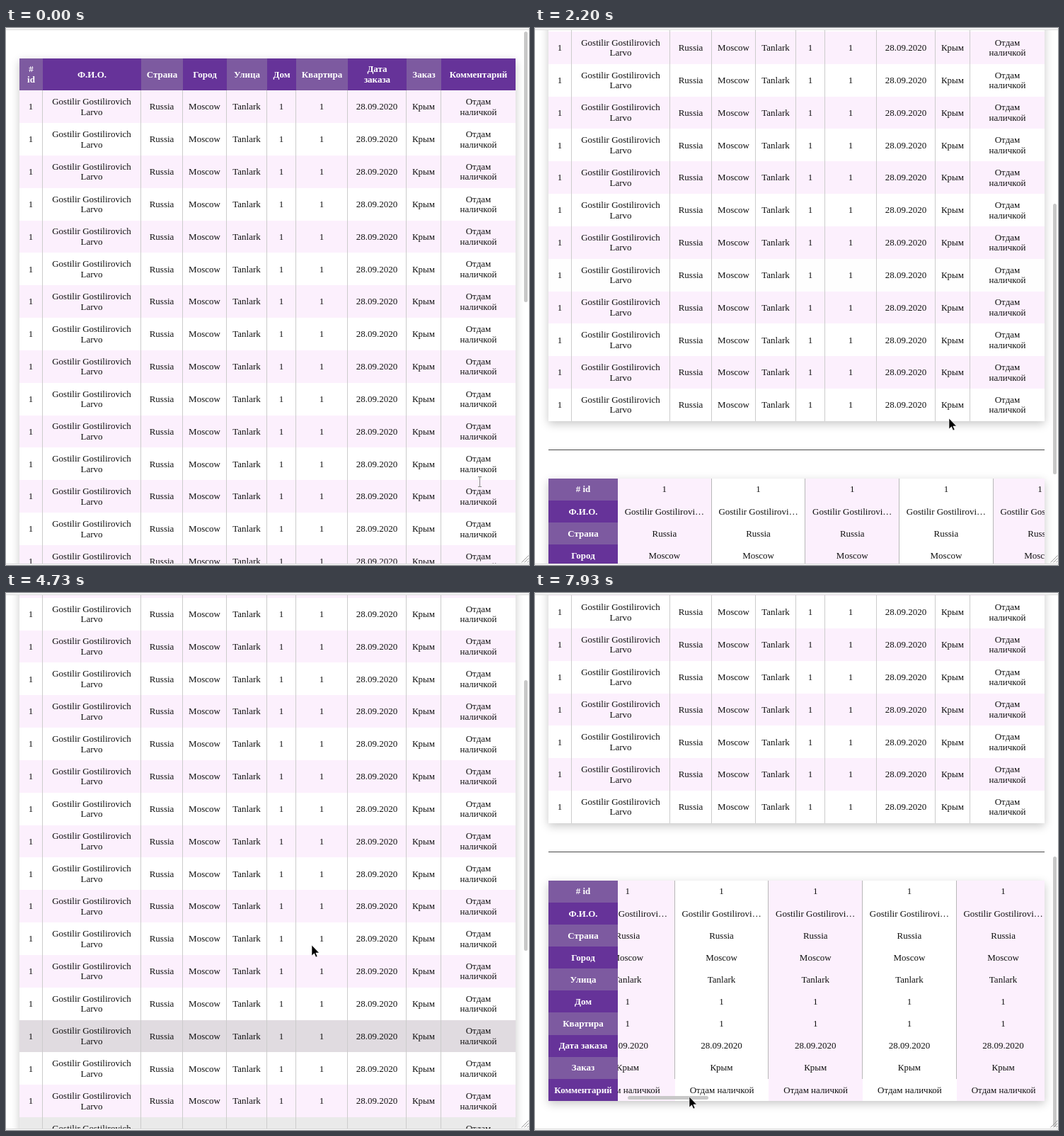
Animation, 739 px wide and 758 px high, one loop 8000 ms. Source, as an HTML page:

```html
<!DOCTYPE html>
<html lang="ru">
<head>
<meta charset="utf-8">
<title>Таблица заказов</title>
<style>
html, body { margin: 0; width: 100%; height: 100%; overflow: hidden; background: #fff; }
body { position: relative; font: 13px/14.6px "Liberation Serif", serif; color: #111; }
.abs, .table, .page, .view { position: absolute; }
.frame-top { left: 0; top: 0; width: 739px; height: 2px; background: #f7f7f7; border-bottom: 1px solid #dcdcdc; }
.frame-bottom { left: 0; top: 756px; width: 739px; height: 1px; background: #d8d8d8; }
.view { left: 0; top: 3px; width: 739px; height: 753px; overflow: hidden; }
.page { left: 0; top: -3px; width: 739px; height: 1433px; }
.table { left: 19px; width: 701px; box-shadow: 0 4px 12px rgba(0, 0, 0, .22); }
.cell { display: flex; align-items: center; justify-content: center; text-align: center; white-space: pre; box-sizing: border-box; padding-top: 1px; }
.head { font-weight: bold; color: #fff; background: #639; }
.head.odd { background: #7d5aa0; }
.band { --base: #fff; --hover: 0%; background: color-mix(in srgb, #ccc var(--hover), var(--base)); }
.band.odd { --base: #fcf0fd; }
#orders { top: 42.5px; }
#orders .row { display: grid; height: 45.83px; grid-template-columns: 33px 139px 59px 62px 57px 41px 73px 83px 49px 1fr; }
#orders .band .cell:not(:last-child) { border-right: 1px solid #ccc; }
hr { position: absolute; left: 19px; top: 1045px; width: 701px; height: 1px; margin: 0; border: 0; background: #4a4a4a; }
#cards { top: 1085.7px; height: 311.3px; }
#cards .cell { height: 31.13px; }
#labels { width: 98px; }
#strip { left: 98px; top: 0; width: 603px; height: 100%; overflow: hidden; }
#columns { display: flex; }
#columns .band { flex: none; width: 132.7px; }
#columns .cell:not(:last-child) { border-right: 1px solid #b8b8b8; }
.thumb { background: #c8c8c8; border-radius: 3px; }
#thumb-x { left: 2px; bottom: 2px; width: 114px; height: 5px; }
#thumb-y { left: 732px; top: 5px; width: 5px; height: 382px; }
svg { position: absolute; left: 0; top: 0; }
</style>
</head>
<body>
<div class="abs frame-top"></div>
<div class="view">
  <div class="page" id="page">
    <div class="table" id="orders"></div>
    <hr>
    <div class="table" id="cards">
      <div id="labels"></div>
      <div class="abs" id="strip">
        <div id="columns"></div>
        <div class="abs thumb" id="thumb-x"></div>
      </div>
    </div>
  </div>
</div>
<div class="abs thumb" id="thumb-y"></div>
<div class="abs frame-bottom"></div>
<svg width="739" height="758">
  <path d="M728.5 754.5l10-10M732.5 754.5l6-6M736.5 754.5l2-2" stroke="#999" fill="none"/>
  <path id="beam" d="M667 633.5h5M669.5 634v13M667 647.5h5" stroke="#888" fill="none"/>
  <path id="arrow" d="M0 0V15L3.5 11.8 5.8 17 8 16 5.8 11H10.500Z" stroke="#fff" stroke-width=".6"/>
</svg>
<script>
const LOOP = 8000, STEP = 1000 / 15, FADE = 300, ARROW_FROM = 60;
const heads = ['#\nid', 'Ф.И.О.', 'Страна', 'Город', 'Улица', 'Дом', 'Квартира', 'Дата\nзаказа', 'Заказ', 'Комментарий'];
const order = ['1', 'Gostilir Gostilirovich\nLarvo', 'Russia', 'Moscow', 'Tanlark', '1', '1', '28.09.2020', 'Крым', 'Отдам\nналичкой'];
const shortName = 'Gostilir Gostilirovi…';

// Each move eases to a new value: [start, end, value].
const scrollY = [[780, 1500, 266], [1850, 2350, 501], [4300, 4880, 165], [5200, 5657, 490], [5950, 6255, 680]];
const scrollX = [[7810, 7930, 52]];
const pointerX = [[0, 200, 590], [2150, 2600, 432], [6400, 7400, 206], [7810, 7930, 218]];
const pointerY = [[0, 200, 553], [2150, 2600, 507], [3050, 3100, 502], [3460, 3800, 497], [6400, 7400, 711]];

// What the pointer rests on, from each time on.
const hovers = [[20, 'row11'], [1050, ''], [1300, 'row16'], [1950, ''], [3100, 'row20'], [4630, 'row17'],
  [4830, 'row13'], [5500, 'row20'], [5985, ''], [6100, 'col3'], [6630, 'col2'], [7200, 'col1'], [7350, '']];

const $ = id => document.getElementById(id);
const odd = i => i % 2 ? '' : ' odd';
const flat = text => text.replace('\n', ' ');
const clamp = k => Math.min(1, Math.max(0, k));
const smooth = k => k * k * (3 - 2 * k);
const fade = ms => 1 - (1 - clamp(ms / FADE)) ** 2.1;
const bands = {};

function add(parent, className, text = '') {
  const el = document.createElement('div');
  el.className = className;
  el.textContent = text;
  return parent.appendChild(el);
}

function build() {
  const headRow = add($('orders'), 'row');
  heads.forEach((text, i) => {
    add(headRow, 'cell head' + odd(i), text);
    add($('labels'), 'cell head' + odd(i), flat(text));
  });
  for (let r = 0; r < 20; r++) {
    const row = bands['row' + (r + 1)] = add($('orders'), 'row band' + odd(r));
    order.forEach(text => add(row, 'cell', text));
  }
  for (let c = 0; c < 6; c++) {
    const col = bands['col' + (c + 1)] = add($('columns'), 'band' + odd(c));
    order.forEach((text, i) => add(col, 'cell', i === 1 ? shortName : flat(text)));
  }
}

const follow = (from, moves, t) => moves.reduce(
  (at, [start, end, to]) => at + (to - at) * smooth(clamp((t - start) / (end - start))), from);

function paintHovers(t) {
  const level = {};
  hovers.forEach(([start, key], i) => {
    if (!key) return;
    const end = hovers[i + 1][0];
    level[key] = (level[key] || 0) + fade(t - start) - fade(t - end);
  });
  for (const key in level) bands[key].style.setProperty('--hover', level[key] * 100 + '%');
}

function render(t) {
  const x = Math.round(follow(669, pointerX, t));
  const y = Math.round(follow(640, pointerY, t));
  const sx = follow(0, scrollX, t);
  const sy = Math.round(follow(0, scrollY, t));
  $('page').style.transform = `translateY(${-sy}px)`;
  $('thumb-y').style.transform = `translateY(${Math.round(sy * .54)}px)`;
  $('columns').style.transform = `translateX(${-sx}px)`;
  $('thumb-x').style.transform = `translateX(${sx * .232}px)`;
  $('arrow').setAttribute('transform', `translate(${x} ${y})`);
  $('arrow').style.display = t < ARROW_FROM ? 'none' : '';
  $('beam').style.display = t < ARROW_FROM ? '' : 'none';
  paintHovers(t);
}

function tick() {
  const t = performance.now() % LOOP;
  render(Math.floor((t + 5) / STEP) * STEP);
  requestAnimationFrame(tick);
}

build();
tick();
</script>
</body>
</html>
```
